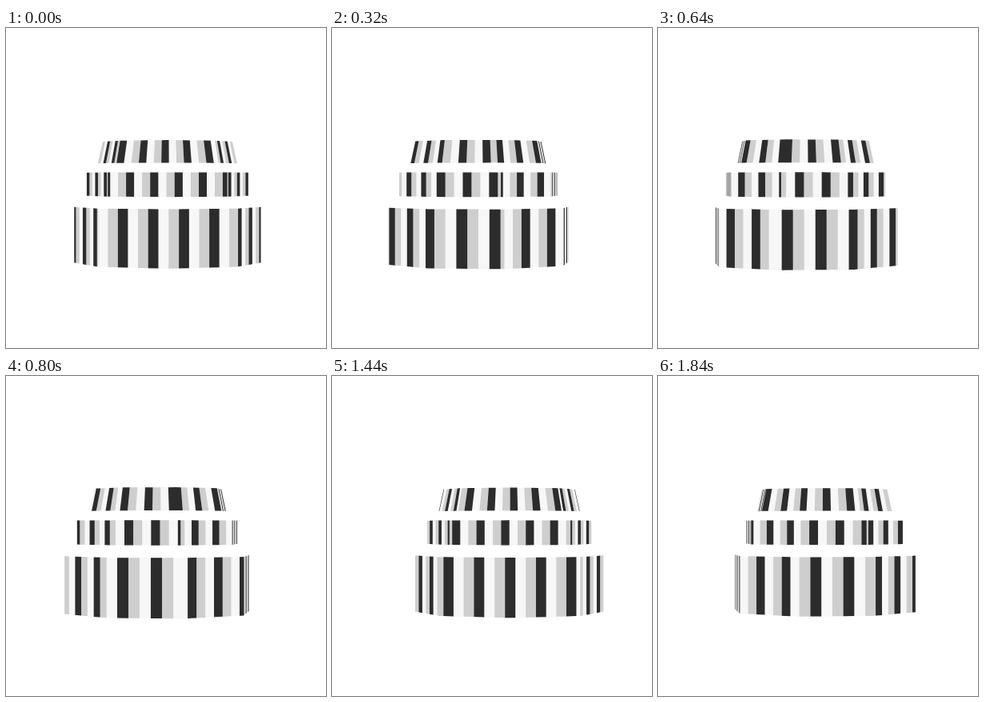
These frames come from a looping animation (400 px wide and 400 px high, 1.92 s). An HTML page:

```html
<!DOCTYPE html>
<html>
<head>
<meta charset="utf-8">
<style>
  html, body { margin: 0; width: 100%; height: 100%; overflow: hidden; background: #fff; }
  svg { display: block; width: 100vw; height: 100vh; }
</style>
</head>
<body>
<svg viewBox="0 0 400 400">
  <path id="white" fill="#f7f7f7"/>
  <path id="gray" fill="#cecece"/>
  <path id="black" fill="#2c2c2c"/>
</svg>
<script>
const LOOP = 1920, STEP = 80;
const CENTER_X = 201.3, EYE_Y = 186, CAMERA = 1755;
const PIVOT = { x: 0.6, z: -20.3 };
const RAD = Math.PI / 180;

// Heights are relative to eye level. Each wall covers two octagon faces;
// "starts" holds the first black stripe of the two wall patterns, in faces.
const tiers = [
  { top: -44.3, bottom: -16.9, topR: 82, bottomR: 88, period: 0.44, starts: [0, 0.12] },
  { top: -5.3, bottom: 24, topR: 102.5, bottomR: 102.5, period: 0.403, starts: [0.31, 0.045] },
  { top: 38.3, bottom: 108.5, topR: 118, bottomR: 118, period: 0.437, starts: [0.287, 0.05] }
];

const layers = ["white", "gray", "black"].map(id => document.getElementById(id));

// Stripes of one wall as [layer, from, to], measured in faces (0 to 2).
// The two rear walls mirror the two front ones.
function wallStripes(tier, wall) {
  const width = tier.period / 3, stripes = [[0, 0, 2]];
  const add = (layer, from) => {
    let a = Math.max(0, from), b = Math.min(2, from + width);
    if (b <= a) return;
    if (wall > 1) [a, b] = [2 - b, 2 - a];
    stripes.push([layer, a, b]);
  };
  for (let s = tier.starts[wall % 2] - tier.period; s < 2 + width; s += tier.period) {
    add(1, s - width);
    add(2, s);
  }
  return stripes;
}

for (const tier of tiers) tier.walls = [0, 1, 2, 3].map(w => wallStripes(tier, w));

function project(x, y, z, turn) {
  const sin = Math.sin(turn), cos = Math.cos(turn);
  const scale = CAMERA / (CAMERA - z - PIVOT.z * cos + PIVOT.x * sin);
  return [CENTER_X + (x + PIVOT.x * cos + PIVOT.z * sin) * scale, EYE_Y + y * scale];
}

function draw(time) {
  const t = Math.floor((time % LOOP) / STEP) * STEP;
  const turn = t / LOOP * 2 * Math.PI;
  const paths = ["", "", ""];

  for (const tier of tiers) {
    for (let face = 0; face < 8; face++) {
      const a = turn + (face * 45 - 45) * RAD, b = a + 45 * RAD;
      const point = (u, radius, y) => project(
        radius * (Math.sin(a) * (1 - u) + Math.sin(b) * u), y,
        radius * (Math.cos(a) * (1 - u) + Math.cos(b) * u), turn);
      if (point(1, tier.bottomR, 0)[0] <= point(0, tier.bottomR, 0)[0]) continue;

      const offset = face % 2;
      for (const [layer, from, to] of tier.walls[face >> 1]) {
        const u = Math.max(0, from - offset), v = Math.min(1, to - offset);
        if (v <= u) continue;
        const corners = [
          point(u, tier.topR, tier.top), point(v, tier.topR, tier.top),
          point(v, tier.bottomR, tier.bottom), point(u, tier.bottomR, tier.bottom)
        ];
        paths[layer] += "M" + corners.map(p => p.map(n => n.toFixed(2)).join(" ")).join("L") + "Z";
      }
    }
  }
  layers.forEach((path, i) => path.setAttribute("d", paths[i]));
}

const start = performance.now();
function tick() {
  draw(performance.now() - start);
  requestAnimationFrame(tick);
}
draw(0);
requestAnimationFrame(tick);
</script>
</body>
</html>
```
